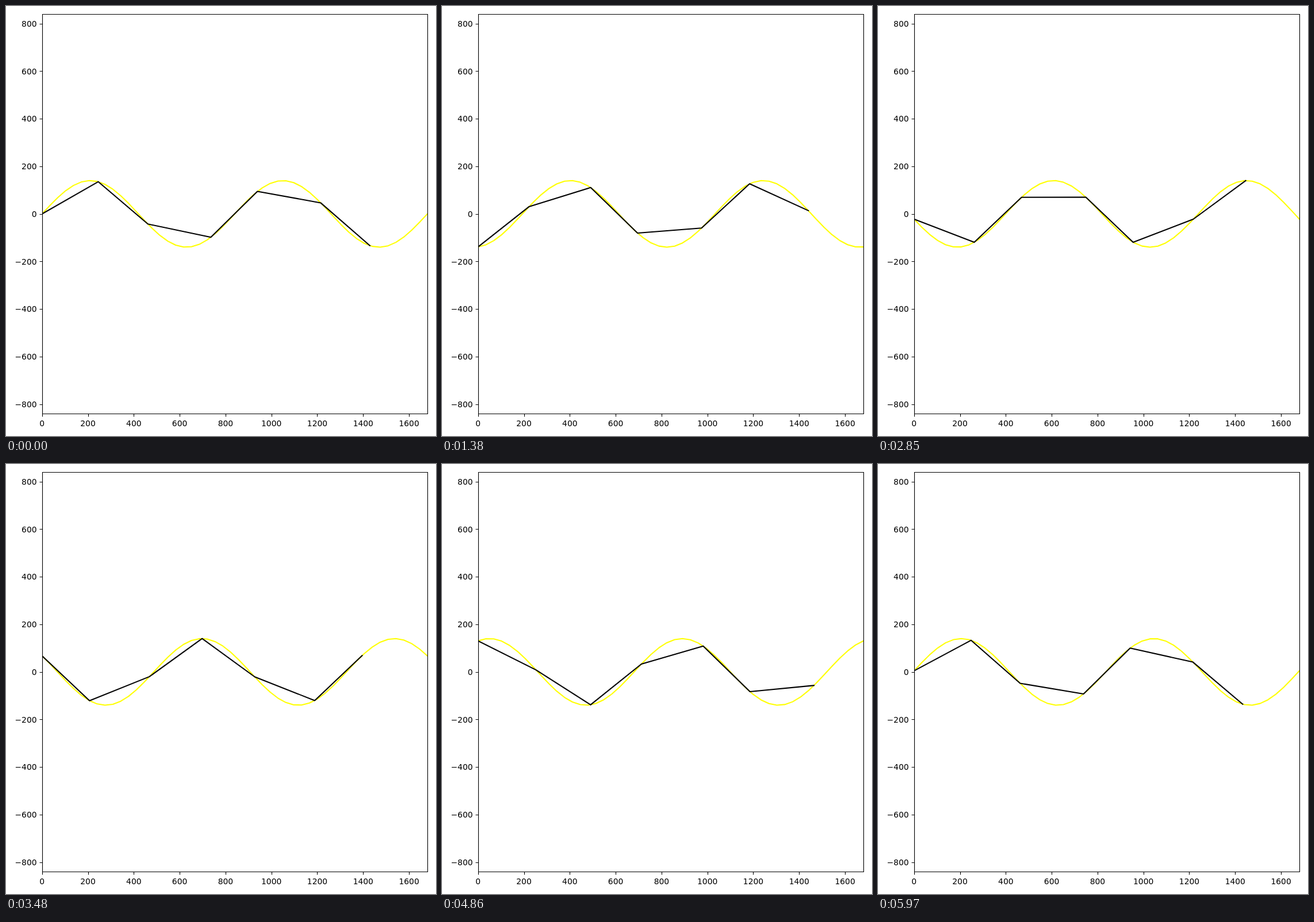
An HTML page for the animation above (6000 ms loop, 748x748 px).

```html
<!DOCTYPE html>
<html lang="en">
<head>
<meta charset="utf-8">
<title>Link chain on a travelling wave</title>
<style>
  html, body { margin: 0; width: 100%; height: 100%; overflow: hidden; background: #fff; }
  svg { display: block; width: 100vw; height: 100vh; }
  text { font: 13.89px "DejaVu Sans", sans-serif; }
  .axes { fill: none; stroke: #000; stroke-width: 1.11; }
  .line { fill: none; stroke-width: 2.083; stroke-linecap: square; stroke-linejoin: round; }
</style>
</head>
<body>
<svg viewBox="0 0 748 748">
  <defs><clipPath id="plot"><rect x="63" y="14" width="670.5" height="695.5"/></clipPath></defs>
  <g clip-path="url(#plot)">
    <polyline id="wave" class="line" stroke="#ff0"/>
    <polyline id="chain" class="line" stroke="#000"/>
  </g>
  <path id="frame" class="axes"/>
  <path id="ticks" class="axes"/>
  <g id="labels"></g>
</svg>
<script>
const LOOP = 6000, STEP = 30;
const SPAN = 1680, PERIOD = 840, AMPLITUDE = 140;
const LINK = 280, LINKS = 6, SAMPLES = 50;
const LEFT = 62.72, RIGHT = 733, TOP = 13.97, BOTTOM = 709.28;

const byId = id => document.getElementById(id);
const px = x => LEFT + x / SPAN * (RIGHT - LEFT);
const py = y => (TOP + BOTTOM) / 2 - y / SPAN * (BOTTOM - TOP);
const snap = v => Math.round(v) + 0.5;
const toPoints = list => list.map(([x, y]) => px(x).toFixed(2) + ',' + py(y).toFixed(2)).join(' ');

function addLabel(value, x, y, anchor) {
  const text = document.createElementNS('http://www.w3.org/2000/svg', 'text');
  text.setAttribute('x', x);
  text.setAttribute('y', y);
  text.setAttribute('text-anchor', anchor);
  text.textContent = String(value).replace('-', '\u2212');
  byId('labels').append(text);
}

function drawAxes() {
  const [left, right, top, bottom] = [LEFT, RIGHT, TOP, BOTTOM].map(snap);
  byId('frame').setAttribute('d', `M${left} ${top}H${right}V${bottom}H${left}Z`);
  let path = '';
  for (let v = 0; v <= 1600; v += 200) {
    path += `M${snap(px(v))} ${bottom}v5`;
    addLabel(v, px(v), 731, 'middle');
  }
  for (let v = -800; v <= 800; v += 200) {
    path += `M${left} ${snap(py(v))}h-5`;
    addLabel(v, 53.6, Math.round(py(v) + 5.3), 'end');
  }
  byId('ticks').setAttribute('d', path);
}

// Point further along the curve at exactly one link length, by bisection.
function nextJoint([x, y], height) {
  let low = x, high = x + LINK;
  for (let i = 0; i < 40; i++) {
    const mid = (low + high) / 2;
    if (Math.hypot(mid - x, height(mid) - y) < LINK) low = mid;
    else high = mid;
  }
  return [low, height(low)];
}

function render(time) {
  const phase = Math.floor((time % LOOP) / STEP) * STEP / LOOP;
  const height = x => AMPLITUDE * Math.sin(2 * Math.PI * (x / PERIOD - phase));
  const wave = Array.from({ length: SAMPLES }, (_, i) => {
    const x = SPAN * i / (SAMPLES - 1);
    return [x, height(x)];
  });
  const joints = [[0, height(0)]];
  for (let i = 0; i < LINKS; i++) joints.push(nextJoint(joints[i], height));
  byId('wave').setAttribute('points', toPoints(wave));
  byId('chain').setAttribute('points', toPoints(joints));
}

drawAxes();
const start = performance.now();
function tick() {
  render(performance.now() - start);
  requestAnimationFrame(tick);
}
tick();
</script>
</body>
</html>
```
